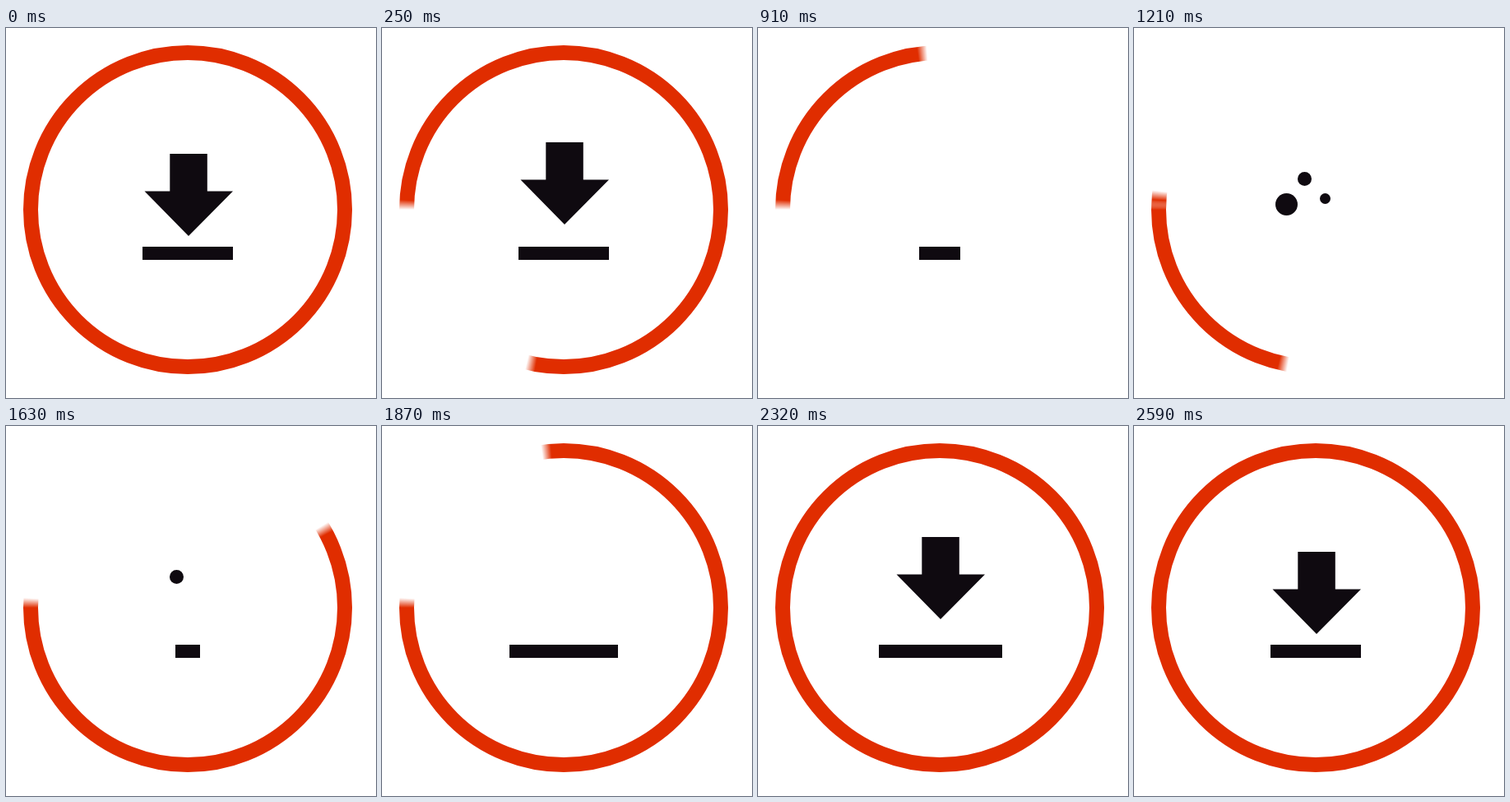
An HTML page with a canvas for the animation above (5.13 s loop, 450x450 px).

```html
<!DOCTYPE html>
<html lang="en">
<head>
<meta charset="utf-8">
<title>Download loop</title>
<style>
  html, body { margin: 0; width: 100%; height: 100%; overflow: hidden; background: #fff; }
  canvas { display: block; width: 450px; height: 450px; }
</style>
</head>
<body>
<canvas id="stage" width="450" height="450"></canvas>
<script>
const ctx = document.getElementById('stage').getContext('2d');
const LOOP = 5130, STEP = 30, START = 70;
const INK = '#0f0a10', RED = '224,45,0';
const ARROW = new Path2D('M199.3 153h45.5v45.4h31.2l-54 54.6l-53.5-54.6h30.8z');

const easeIn = x => x * x;
const easeOut = x => x * (2 - x);
const easeInOut = x => x * x * (3 - 2 * x);

// progress from 0 to 1 between two times
const part = (t, from, to) => Math.min(1, Math.max(0, (t - from) / (to - from)));

// share of the ring passed by its moving end, counterclockwise from the left
const sweep = t => part(t, START, 1230) ** 0.82;

// the arrow winds up, drops through the bar, then comes back the same way
const lift = t =>
  -19 * easeInOut(part(t, 60, 340)) + 124 * easeIn(part(t, 340, 736)) -
  124 * easeOut(part(t, 1900, 2360)) + 19 * easeInOut(part(t, 2360, 2590));

// the bar stretches, closes, opens wide and relaxes
const barWidth = t =>
  110 + 52 * part(t, 550, 773) - 162 * part(t, 800, 960) +
  162 * part(t, 1560, 1938) - 52 * easeInOut(part(t, 2200, 2590));

function disc(x, y, r) {
  ctx.beginPath();
  ctx.arc(x, y, r, 0, 2 * Math.PI);
}

function strokeRing(style) {
  ctx.strokeStyle = style;
  ctx.lineWidth = 18;
  disc(0, 0, 191);
  ctx.stroke();
}

// the swept part (shown = 1) or the remaining part (shown = 0), with soft ends
function softArc(swept, shown) {
  const soft = 3.5 / 360;
  const edge = Math.max(soft, swept + soft / 2);
  const paint = ctx.createConicGradient(Math.PI - soft * 2 * Math.PI, 0, 0);
  const stop = (at, a) => paint.addColorStop(Math.min(1, at), `rgba(${RED},${a})`);
  stop(0, 1 - shown);
  stop(soft, shown);
  stop(edge, shown);
  stop(edge + soft, 1 - shown);
  strokeRing(paint);
}

function drawRing(t) {
  const gone = sweep(t), back = sweep(t - 960);
  ctx.save();
  ctx.translate(221, 221);
  ctx.scale(1, -1);
  if (t < START || back === 1) {
    strokeRing(`rgb(${RED})`);
  } else {
    if (gone < 1) softArc(gone, 0);
    if (back > 0) softArc(back, 1);
  }
  ctx.restore();
}

function drawArrow(t) {
  ctx.save();
  ctx.beginPath();
  ctx.rect(0, 0, 450, 257.5);
  ctx.clip();
  ctx.translate(0, Math.round(lift(t)));
  ctx.fill(ARROW);
  ctx.restore();
}

function drawBar(t) {
  const w = 2 * Math.round(barWidth(t) / 2);
  const middle = w > 140 ? 222 : 221;
  ctx.fillRect(middle - w / 2, 266, w, 16);
}

// bubbles pop up one after another and leave in the same order
function drawBubble(t, i, x, y, r) {
  const start = 1000 + 60 * i, end = 1400 + 160 * i;
  const size = easeOut(part(t, start, start + 80)) - easeIn(part(t, end - 80, end));
  disc(x, y, r * size);
  ctx.fill();
}

function draw(now) {
  const time = now % LOOP;
  const t = time < START ? 0 : START + Math.floor((time - START) / STEP) * STEP;
  ctx.fillStyle = '#fff';
  ctx.fillRect(0, 0, 450, 450);
  drawRing(t);
  ctx.fillStyle = INK;
  drawArrow(t);
  drawBar(t);
  drawBubble(t, 0, 185.5, 214.5, 13.5);
  drawBubble(t, 1, 232.5, 207.5, 6.5);
  drawBubble(t, 2, 207.5, 183.5, 8.5);
}

let begin;
function tick(now) {
  begin ??= now;
  draw(now - begin);
  requestAnimationFrame(tick);
}
requestAnimationFrame(tick);
</script>
</body>
</html>
```
